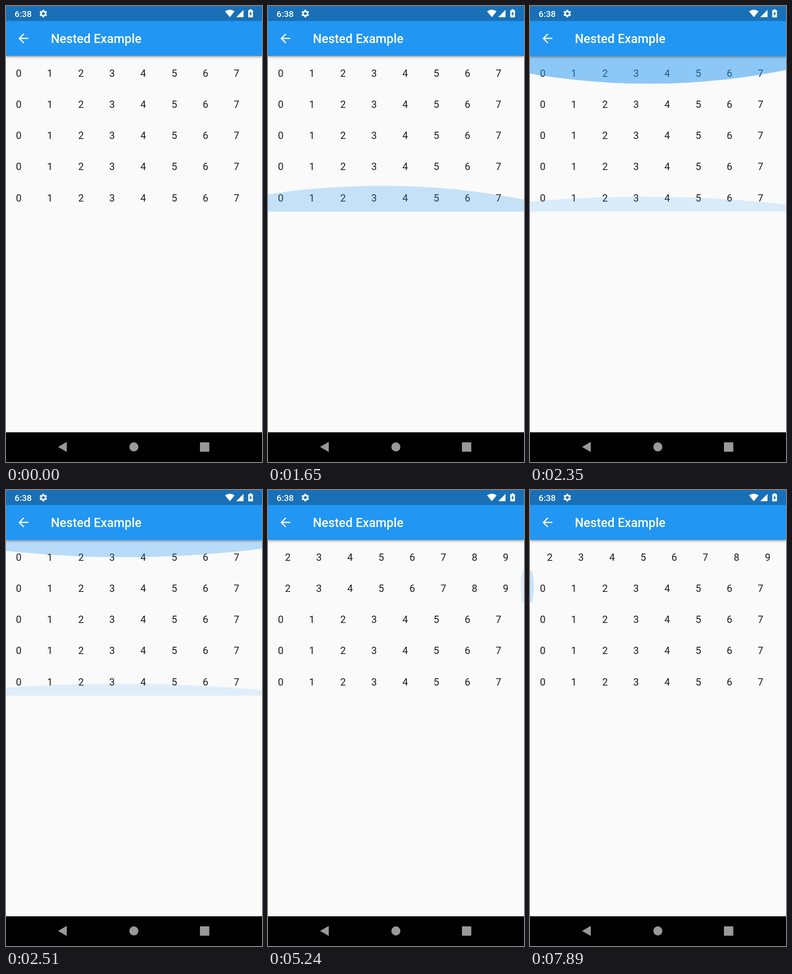
Animation, 561 px wide and 998 px high, one loop 8000 ms. Source, as an HTML page:

```html
<!DOCTYPE html>
<html lang="en">
<head>
<meta charset="utf-8">
<title>Nested Example</title>
<style>
  html, body { margin: 0; width: 100%; height: 100%; overflow: hidden; background: #fafafa; }
  svg { display: block; width: 561px; height: 998px; font-family: Roboto, sans-serif; }
  #rows { font-size: 21.82px; fill: #1e1e1e; }
  #bar { filter: drop-shadow(0 2px 2.5px rgba(0, 0, 0, .34)) drop-shadow(0 1px 2px rgba(0, 0, 0, .14)); }
  .white { fill: #fff; font-weight: 500; }
</style>
</head>
<body>
<svg viewBox="0 0 561 998">
  <defs>
    <clipPath id="listClip"><rect y="109.09" width="561" height="340.91"/></clipPath>
    <clipPath id="rowClip"><rect y="177.27" width="561" height="68.18"/></clipPath>
  </defs>
  <rect width="561" height="998" fill="#fafafa"/>

  <g id="rows"></g>
  <g id="rowGlows" clip-path="url(#rowClip)" fill="#2196f3"></g>
  <g id="listGlows" clip-path="url(#listClip)" fill="#2196f3"></g>

  <rect id="bar" y="0" width="561" height="109.09" fill="#2196f3"/>
  <rect width="561" height="32.73" fill="#1970b6"/>

  <g class="white">
    <text x="18.8" y="23.8" font-size="19.1">6:38</text>
    <text x="98.2" y="81" font-size="27.27">Nested Example</text>
    <path transform="translate(21.8 54.6) scale(1.3636)"
      d="M20 11H7.83l5.59-5.59L12 4l-8 8 8 8 1.41-1.41L7.83 13H20z"/>
    <path d="M480 11.8Q490.5 4.4 501 11.8L490.5 24.5Z"/>
    <path d="M520.5 8.5V24.5H504.5Z"/>
    <path d="M534 7h4v2h2q1.2 0 1.2 1.2v13.6q0 1.2-1.2 1.2h-8q-1.2 0-1.2-1.2V10.2q0-1.2 1.2-1.2h2z"/>
    <path d="M537 11.5l-4 6.2h2.3v4.5l4-6.4H537z" fill="#1970b6"/>
  </g>
  <g fill="none" stroke="#fff" transform="translate(81.7 16.6) rotate(15)">
    <circle r="4.8" stroke-width="3.4"/>
    <circle r="7.1" stroke-width="2.8" pathLength="12" stroke-dasharray="1 1"/>
  </g>

  <rect y="933" width="561" height="65"/>
  <g fill="#999">
    <path d="M114 965L133.2 954V976Z"/>
    <circle cx="280.2" cy="965" r="9.9"/>
    <rect x="425" y="955" width="20.5" height="20.5" rx="1"/>
  </g>
</svg>
<script>
const LOOP = 8000, WIDTH = 561, TOP = 109.09, BOTTOM = 450, CELL = 68.18;
const MAX_SCROLL = CELL * 10 - WIDTH;
const NS = 'http://www.w3.org/2000/svg';

const add = (parent, tag, attrs = {}) => {
  const node = document.createElementNS(NS, tag);
  set(node, attrs);
  parent.append(node);
  return node;
};
const set = (node, attrs) => {
  for (const key in attrs) node.setAttribute(key, attrs[key]);
};
const span = (t, from, to) => Math.min(1, Math.max(0, (t - from) / (to - from)));
const smooth = p => p * p * (3 - 2 * p);

const rows = Array.from({ length: 5 }, (_, r) => {
  const row = add(document.getElementById('rows'), 'g');
  for (let i = 0; i < 10; i++) {
    add(row, 'text', { x: 21.82 + i * CELL, y: 154.9 + r * CELL }).textContent = i;
  }
  return row;
});

// Overscroll glow: pulled in from start to full, then recedes from release over fade ms.
const glows = [
  { side: 'bottom', start: 1000, full: 1690, release: 1870, fade: 2000, reach: 56.5, alpha: .26, center: 248 },
  { side: 'top', start: 1760, full: 2300, release: 2384, fade: 600, reach: 61, alpha: .5, center: 260 },
  { side: 'right', start: 4770, full: 4910, release: 5077, fade: 2000, reach: 8.8, alpha: .155, center: 211.4 },
  { side: 'left', start: 7620, full: 7890, release: 8100, fade: 2000, reach: 8.5, alpha: .23, center: 211.4 },
];
for (const glow of glows) {
  glow.inRow = glow.side === 'left' || glow.side === 'right';
  glow.node = add(document.getElementById(glow.inRow ? 'rowGlows' : 'listGlows'), 'ellipse');
}

function drawGlow(glow, t) {
  const pull = span(t, glow.start, glow.full);
  const left = (1 - span(t, glow.release, glow.release + glow.fade)) ** 2;
  const breadth = glow.inRow ? CELL : WIDTH;
  const radius = breadth * 1.5;
  const depth = breadth * .75 * (2 - Math.sqrt(3));
  const scale = glow.reach / depth * (1 - (1 - pull) ** 3) * left;
  const inset = (depth - radius) * scale;
  const along = { top: TOP + inset, bottom: BOTTOM - inset, left: inset, right: WIDTH - inset }[glow.side];
  const flat = radius * scale;
  set(glow.node, glow.inRow
    ? { cx: along, cy: glow.center, rx: flat, ry: radius }
    : { cx: glow.center, cy: along, rx: radius, ry: flat });
  glow.node.setAttribute('opacity', glow.alpha * pull * left);
}

function draw(t) {
  const first = smooth(span(t, 2850, 3285));
  const second = smooth(span(t, 3720, 4160)) - smooth(span(t, 5280, 6400));
  [first, second].forEach((p, i) => set(rows[i], { transform: `translate(${-MAX_SCROLL * p} 0)` }));
  glows.forEach(glow => drawGlow(glow, t));
}

const begin = performance.now();
function tick() {
  draw((performance.now() - begin) % LOOP);
  requestAnimationFrame(tick);
}
tick();
</script>
</body>
</html>
```
